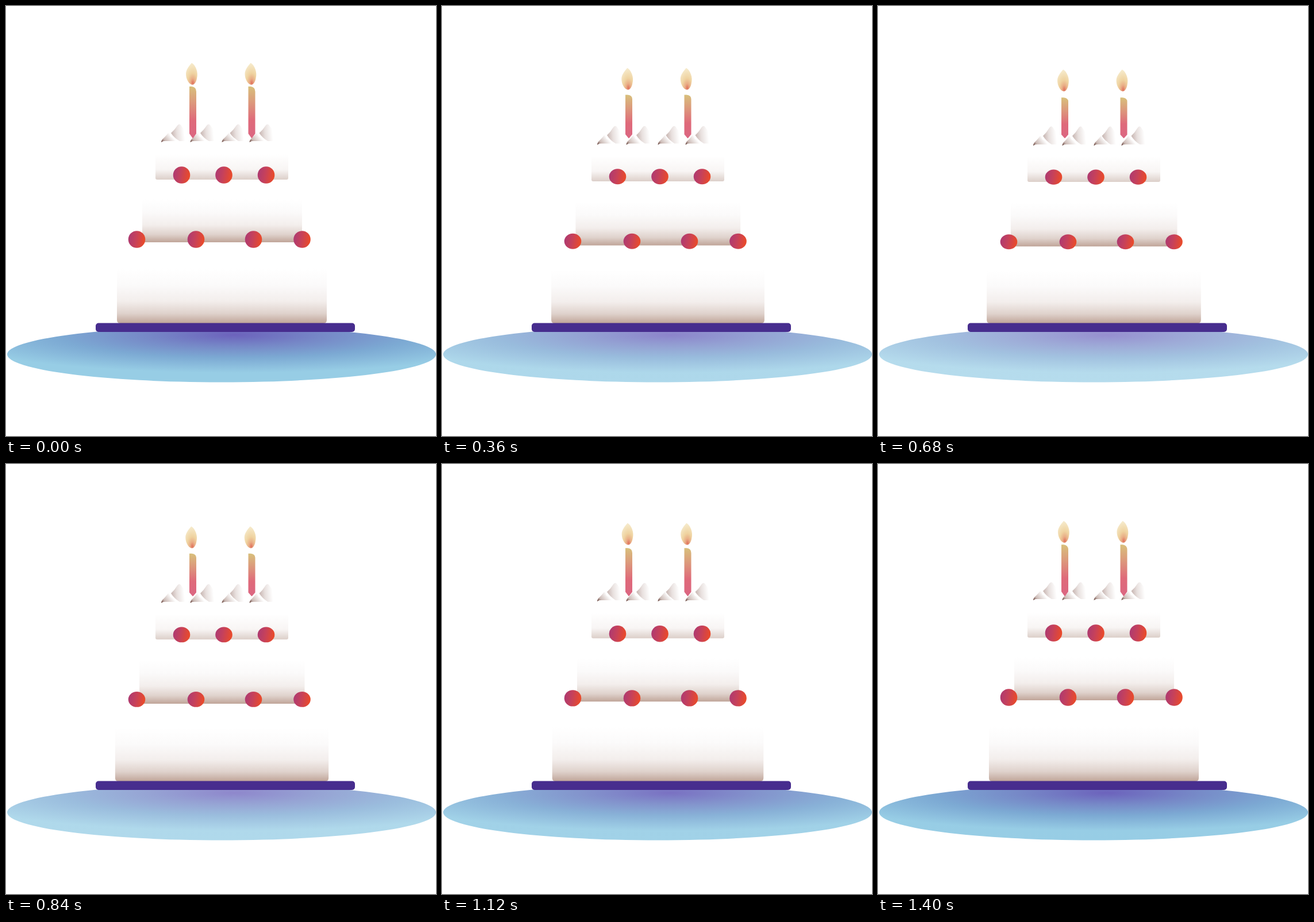
Write an HTML page that moves like this. It is 748 px wide and 748 px high and loops after 1440 ms.

```html
<!DOCTYPE html>
<html lang="en">
<head>
<meta charset="utf-8">
<title>Birthday cake</title>
<style>
  html, body { margin: 0; width: 100%; height: 100%; overflow: hidden; background: #fff; }
  svg { display: block; width: 100%; height: 100%; }
</style>
</head>
<body>
<svg viewBox="0 0 748 748">
  <defs>
    <radialGradient id="table" cx=".53" cy=".15" r=".68">
      <stop offset="0" stop-color="#6c62bc"/>
      <stop offset=".3" stop-color="#7688c7"/>
      <stop offset=".6" stop-color="#7ca9d3"/>
      <stop offset="1" stop-color="#97cde5"/>
    </radialGradient>
    <linearGradient id="sponge" x2="0" y2="1">
      <stop offset="0" stop-color="#fff"/>
      <stop offset=".3" stop-color="#fbfafa"/>
      <stop offset=".6" stop-color="#f3eeec"/>
      <stop offset=".82" stop-color="#dfd2cc"/>
      <stop offset="1" stop-color="#c0a599"/>
    </linearGradient>
    <linearGradient id="topSponge" x2="0" y2="1">
      <stop offset="0" stop-color="#fff"/>
      <stop offset=".6" stop-color="#f8f5f4"/>
      <stop offset="1" stop-color="#dccfc9"/>
    </linearGradient>
    <linearGradient id="cherry" y2=".15">
      <stop offset="0" stop-color="#aa3974"/>
      <stop offset=".5" stop-color="#c6415b"/>
      <stop offset="1" stop-color="#e84a2c"/>
    </linearGradient>
    <linearGradient id="wax" x2="0" y2="1">
      <stop offset="0" stop-color="#d8c07c"/>
      <stop offset=".3" stop-color="#dc9a7c"/>
      <stop offset=".65" stop-color="#df6a7a"/>
      <stop offset="1" stop-color="#db6682"/>
    </linearGradient>
    <radialGradient id="fire" cx=".6" cy=".92" r=".9">
      <stop offset="0" stop-color="#e0705c"/>
      <stop offset=".22" stop-color="#e9ad86"/>
      <stop offset=".5" stop-color="#efd3a0"/>
      <stop offset="1" stop-color="#f6ebcd"/>
    </radialGradient>
    <linearGradient id="cream" x2=".9" y2="-.1">
      <stop offset="0" stop-color="#cbbab6"/>
      <stop offset=".4" stop-color="#e8e0de"/>
      <stop offset="1" stop-color="#fff"/>
    </linearGradient>
    <linearGradient id="shade" y1=".9" x2=".8" y2=".5">
      <stop offset="0" stop-color="#6d4a43"/>
      <stop offset=".3" stop-color="#cbbab5"/>
      <stop offset="1" stop-color="#fff"/>
    </linearGradient>
  </defs>
  <ellipse id="cloth" cx="375" cy="606" rx="373" ry="48.5" fill="url(#table)"/>
  <path id="low" fill="url(#sponge)"/>
  <rect x="156" y="551.5" width="451" height="15.5" rx="5" fill="#472d8e"/>
  <path id="mid" fill="url(#sponge)"/>
  <path id="top" fill="url(#topSponge)"/>
  <g id="cherries" fill="url(#cherry)"></g>
  <g id="swirls"></g>
  <g id="candles" fill="url(#wax)"></g>
  <g id="flames" fill="url(#fire)"></g>
</svg>
<script>
const $ = id => document.getElementById(id);
const LOOP = 1440, FALL = 600, STEP = 40;

function add(parent, tag, attrs) {
  const el = document.createElementNS('http://www.w3.org/2000/svg', tag);
  for (const name in attrs) el.setAttribute(name, attrs[name]);
  return $(parent).appendChild(el);
}

const cherry = (y, drop) => cx => ({
  el: add('cherries', 'ellipse', { cx, rx: 14.8 }), y, drop
});
const cherries = [
  ...[305.5, 379, 452.5].map(cherry(294, 3.8)),
  ...[227.5, 330.5, 430.5, 515].map(cherry(406, 4.4))
];

for (const x of [287, 338, 389.5, 440.5])
  add('swirls', 'path', {
    transform: `translate(${x})`, fill: 'url(#cream)',
    d: 'M0 16Q6 11 11 3Q14 -1 17 2Q20 7 24 11V30H15Q5 24 0 16Z'
  });
for (const x of [270, 320.5, 375.5, 423.5])
  add('swirls', 'path', {
    transform: `translate(${x})`, fill: 'url(#shade)',
    d: 'M0 32Q0 28 5 24Q9 20 12 16Q15 17 16 22Q25 25 26 30H4Z'
  });

for (const x of [319, 421.5]) {
  add('candles', 'path', {
    transform: `translate(${x})`,
    d: 'M0 -90H4Q12 -89 12 -81V-8L7 -1Q6 1 5 -1L0 -8Z'
  });
  add('flames', 'path', {
    transform: `translate(${x})`,
    d: 'M4 99C11 103 16 115 13 126C12 132 9 137 5 137C-1 136 -6 127 -6 118C-6 111 -1 105 4 99Z'
  });
}

// Rises from 0 to 1 with the given starting slope and a soft landing
const ease = (x, slope) => slope * x * (1 - x) ** 2 + x * x * (3 - 2 * x);

function squash(t) {
  return t < FALL ? ease(t / FALL, 0.8) : 1 - ease((t - FALL) / (LOOP - FALL), 0.12);
}

function tier(id, left, right, top, bottom, r) {
  $(id).setAttribute('d', `M${left} ${top}H${right}V${bottom - r}` +
    `Q${right} ${bottom} ${right - r} ${bottom}H${left + r}Q${left} ${bottom} ${left} ${bottom - r}Z`);
}

function draw() {
  const t = Math.floor(performance.now() % LOOP / STEP) * STEP;
  const p = squash(t);

  tier('low', 193 - 4 * p, 558 + 4 * p, 456 + 4 * p, 552, 6);
  tier('mid', 237 - 6.3 * p, 515 + 5.7 * p, 336 + 6 * p, 411 + 7.5 * p, 4);
  tier('top', 260, 491, 258 + 4 * p, 302 + 4.2 * p, 3);
  for (const { el, y, drop } of cherries) {
    el.setAttribute('cy', y + drop * p);
    el.setAttribute('ry', 14.8 - 1.8 * p);
  }
  $('swirls').setAttribute('transform', `translate(0 ${205 + 4 * p}) scale(1 ${1 + p / 15})`);
  $('candles').setAttribute('transform', `translate(0 230) scale(1 ${1 - p * 20 / 90})`);
  $('flames').setAttribute('transform', `translate(${-p} ${12 * p})`);
  $('cloth').setAttribute('opacity', 1 - 0.3 * p);
  requestAnimationFrame(draw);
}
draw();
</script>
</body>
</html>
```
